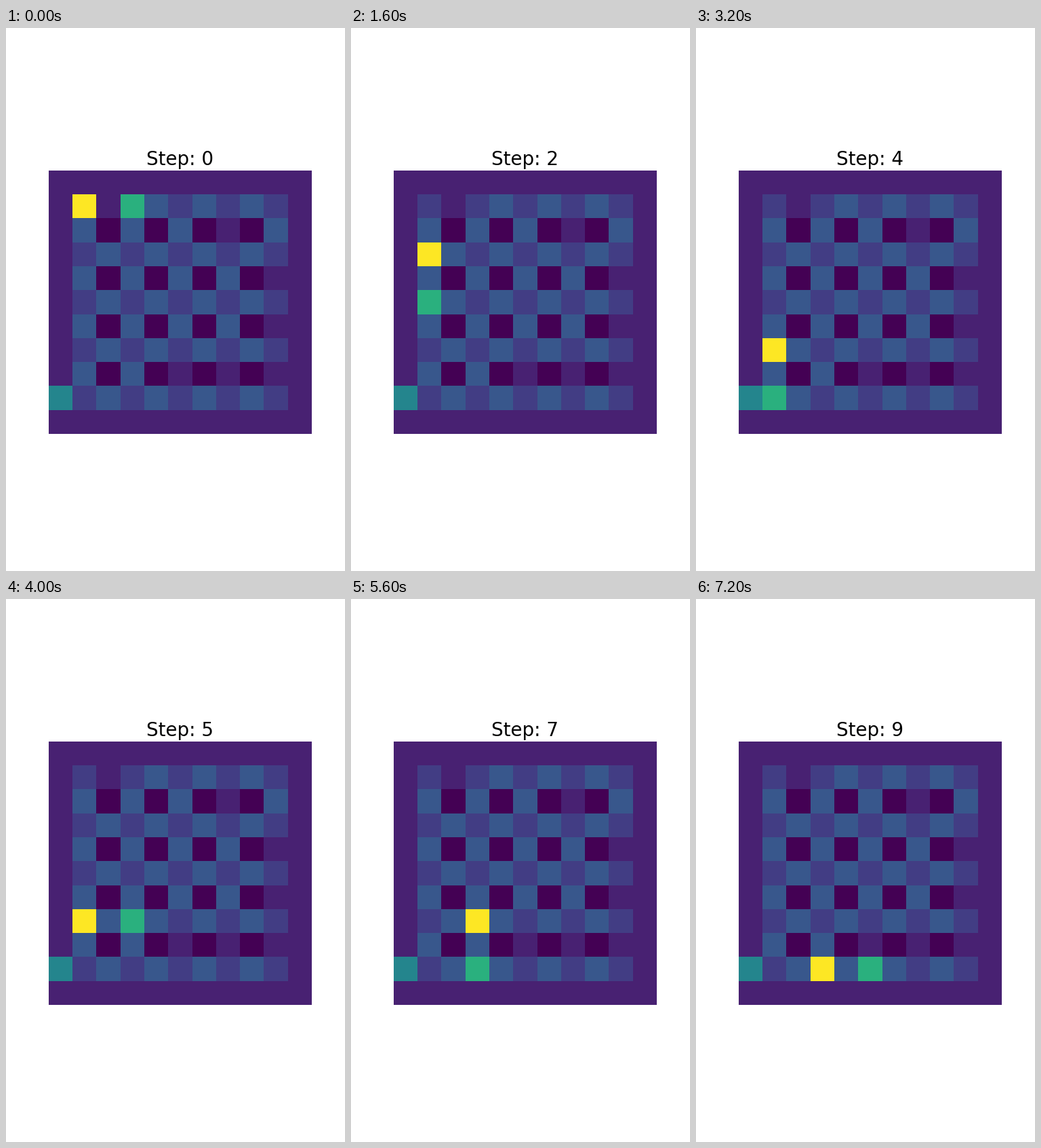
A matplotlib script for the animation above (8 s loop, 500 by 800 pixels).

```python
import numpy as np
import matplotlib.pyplot as plt
from matplotlib.animation import FuncAnimation

SIZE = 11
PILLAR, FREE, ROOM, DOOR, EXIT, GOAL, AGENT = 0, 1, 2, 3, 5, 7, 11

# One try per step: south, east or wait; lower case means the way is blocked
TRIES = "eSSSsEeS.E"
MOVES = {"S": np.array([2, 0]), "E": np.array([0, 2]), ".": np.array([0, 0])}


def make_maze():
    maze = np.full((SIZE, SIZE), FREE)
    inner = maze[1:-1, 1:-1]
    inner[:] = DOOR
    inner[::2, ::2] = ROOM
    inner[1::2, 1::2] = PILLAR
    # doors already cleared
    maze[4:9:2, 9] = FREE
    maze[8, 5:9:2] = FREE
    maze[1, 2] = maze[2, 7] = FREE
    maze[9, 0] = EXIT
    return maze


def walk(step):
    """Return the agent's cell and the cell it tries next."""
    agent = np.array([1, 1])
    for way in TRIES[:step]:
        if way.isupper():
            agent = agent + MOVES[way]
    goal = agent + MOVES[TRIES[step].upper()]
    return tuple(agent), tuple(goal)


maze = make_maze()

fig, ax = plt.subplots(figsize=(5, 8), dpi=100)
ax.axis("off")
image = ax.imshow(maze, cmap="viridis", vmin=PILLAR, vmax=AGENT)
title = ax.set_title("Step: 0", fontsize=20)


def draw(step):
    agent, goal = walk(step)
    grid = maze.copy()
    grid[goal] = GOAL
    grid[agent] = AGENT
    image.set_data(grid)
    title.set_text(f"Step: {step}")
    return image, title


anim = FuncAnimation(fig, draw, frames=len(TRIES), interval=800,
                     repeat=True, repeat_delay=0)
plt.show()
```
